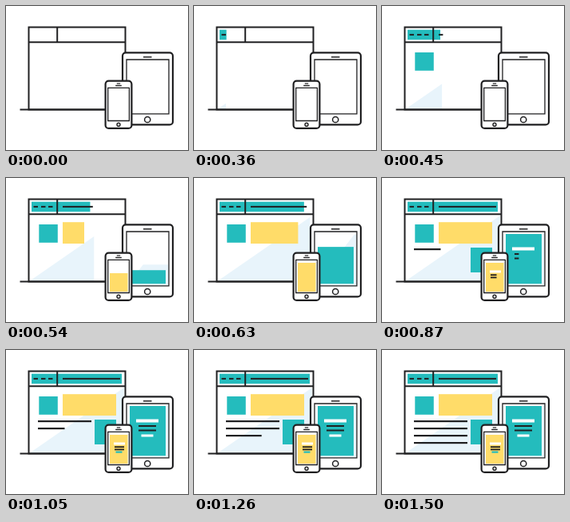
Animation, 228 px wide and 180 px high, one loop 2.1 s. Source, as an HTML page with a canvas:

```html
<!DOCTYPE html>
<html lang="en">
<head>
<meta charset="utf-8">
<title>Responsive layout</title>
<style>
  html, body { margin: 0; width: 100%; height: 100%; overflow: hidden; background: #fff; }
  canvas { display: block; width: 228px; height: 180px; }
</style>
</head>
<body>
<canvas></canvas>
<script>
const LOOP = 2100, STEP = 30, DELAY = 12, SPEED = 10.8;
const INK = '#202022', TEAL = '#24bcbd', YELLOW = '#ffdc69', PALE = '#e8f4fb', WHITE = '#fff';

const canvas = document.querySelector('canvas');
const ctx = canvas.getContext('2d');
const scale = window.devicePixelRatio || 1;
canvas.width = 228 * scale;
canvas.height = 180 * scale;
ctx.scale(scale, scale);

let step = 0;

const grown = (start, size, speed) => Math.max(0, Math.min(size, (step - start) * speed));

// Grows rightwards from its left edge.
function wipe(start, x, y, w, h, color, speed = SPEED) {
  ctx.fillStyle = color;
  ctx.fillRect(x, y, grown(start, w, speed), h);
}

// Grows upwards from its bottom edge.
function rise(start, x, y, w, h, color, speed = 9.7) {
  const shown = grown(start, h, speed);
  ctx.fillStyle = color;
  ctx.fillRect(x, y + h - shown, w, shown);
}

// Pale lower-right half of a screen, limited to the part already revealed.
function glare(x, y, w, h, shownW, shownH) {
  ctx.save();
  ctx.beginPath();
  ctx.rect(x, y + h - shownH, shownW, shownH);
  ctx.clip();
  ctx.beginPath();
  ctx.moveTo(x, y + h);
  ctx.lineTo(x + w, y);
  ctx.lineTo(x + w, y + h);
  ctx.fillStyle = PALE;
  ctx.fill();
  ctx.restore();
}

function box(x, y, w, h, radius, width, fill) {
  ctx.beginPath();
  ctx.roundRect(x, y, w, h, radius);
  if (fill) {
    ctx.fillStyle = fill;
    ctx.fill();
  }
  ctx.lineWidth = width;
  ctx.stroke();
}

function line(x1, y1, x2, y2, width) {
  ctx.beginPath();
  ctx.moveTo(x1, y1);
  ctx.lineTo(x2, y2);
  ctx.lineWidth = width;
  ctx.stroke();
}

function ring(x, y, r, width) {
  ctx.beginPath();
  ctx.arc(x, y, r, 0, 2 * Math.PI);
  ctx.lineWidth = width;
  ctx.stroke();
}

function drawBrowser() {
  glare(30, 47, 118, 81.5, grown(-0.86, 118, 11.7), 81.5);

  wipe(-0.8, 32, 29.7, 113, 12.5, TEAL);
  [34.5, 44, 53].forEach(x => wipe((x - 44) / SPEED, x, 34.9, 5.5, 2, INK));
  wipe(2.5, 71, 34.9, 72, 2, INK);

  wipe(0.65, 41.3, 58, 23.5, 22.8, TEAL);
  wipe(3.5, 71, 55.2, 67, 26.8, YELLOW);
  wipe(10, 111, 87, 27, 31, TEAL);
  for (let i = 0; i < 4; i++) wipe(14 + 6 * i, 40, 88 + 9 * i, 67, 2.2, INK, 67 / 6);

  box(28.5, 26.6, 121, 102.8, 0, 2);
  line(28, 45.3, 150, 45.3, 2);
  line(64.2, 26, 64.2, 45, 2);
  line(17.5, 129.5, 126, 129.5, 2);
}

function drawTablet() {
  box(146, 58.4, 63, 90, 4, 2.2, WHITE);
  glare(151.5, 67, 52, 67.5, 52, grown(3.9, 67.5, 12.5));
  rise(4.25, 155, 70, 45, 62.2, TEAL);
  wipe(13.5, 163, 86.5, 28, 4, WHITE);
  wipe(16.5, 166, 94, 22, 2, INK);
  wipe(16.5, 166, 99.5, 22, 2, INK);
  wipe(19, 169.5, 105.5, 15, 3, WHITE);
  box(151, 67, 53, 67.9, 0, 1.3);
  line(172, 63.8, 182.5, 63.8, 1.5);
  ring(177.2, 142, 3.6, 1.5);
}

function drawPhone() {
  box(124.6, 93.7, 32.8, 59.2, 4, 2.2, WHITE);
  rise(3.7, 130, 106, 22.5, 36, YELLOW, 10);
  wipe(14, 135, 115.5, 14, 3, WHITE);
  wipe(16.3, 136, 120.3, 12, 1.8, INK);
  wipe(16.3, 136, 123.5, 12, 1.8, INK);
  wipe(19, 137.5, 126.5, 8, 2.2, TEAL);
  box(127.7, 102.3, 26.7, 41.2, 0, 1.3);
  line(137.2, 99.5, 144.8, 99.5, 1.4);
  line(138.8, 97, 143.2, 97, 1.2);
  ring(141, 148.3, 2, 1.4);
}

function draw(now) {
  step = Math.floor((now % LOOP) / STEP) - DELAY;
  ctx.fillStyle = WHITE;
  ctx.fillRect(0, 0, 228, 180);
  ctx.strokeStyle = INK;
  drawBrowser();
  drawTablet();
  drawPhone();
}

const began = performance.now();
function tick() {
  draw(performance.now() - began);
  requestAnimationFrame(tick);
}
tick();
</script>
</body>
</html>
```
